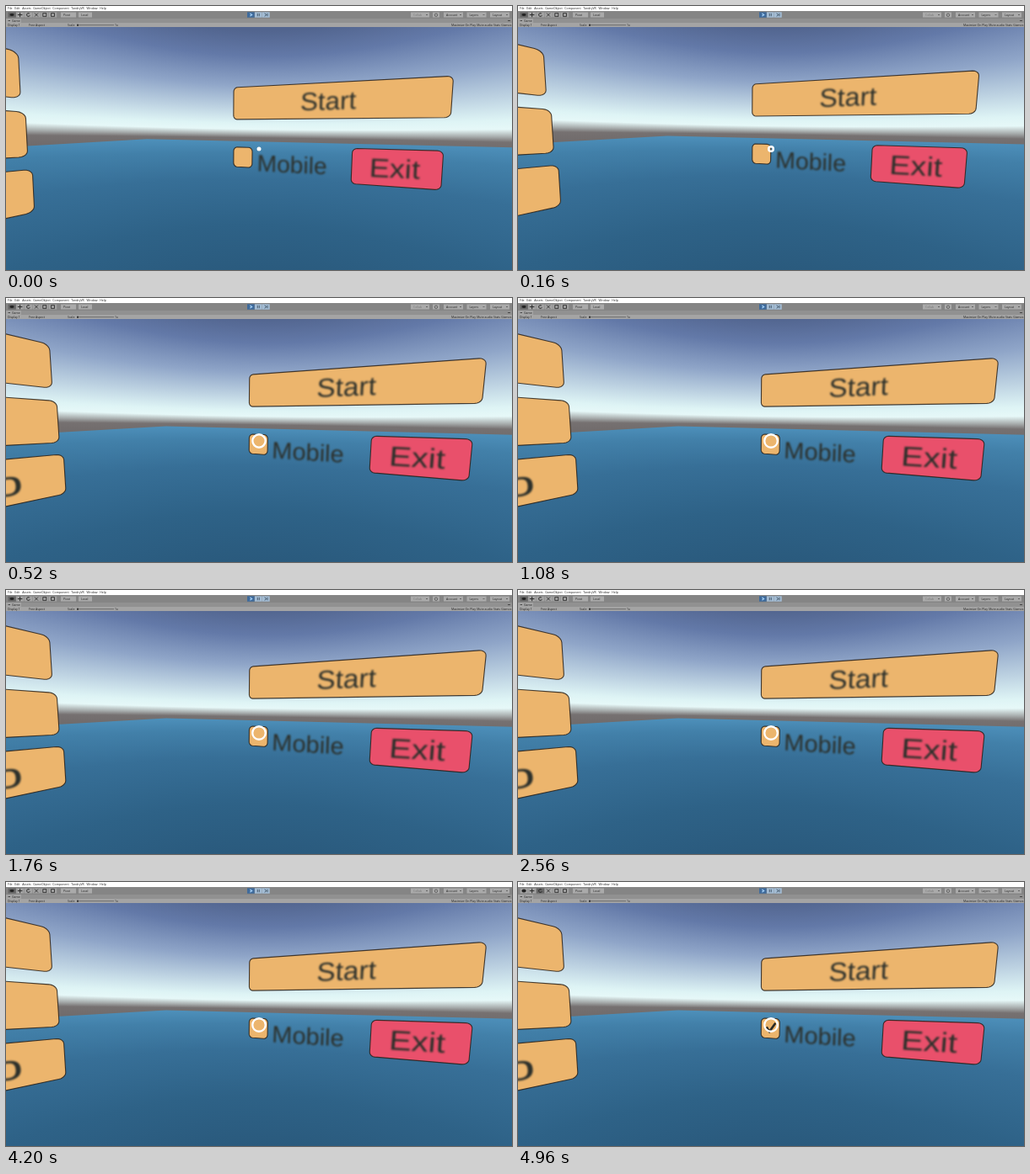
An HTML page with a canvas that plays this animation: 600 px wide and 314 px high, repeating every 5 s.

```html
<!DOCTYPE html>
<html lang="en">
<head>
<meta charset="utf-8">
<title>VR menu</title>
<style>
  html, body { margin: 0; height: 100%; overflow: hidden; }
  canvas { display: block; }
</style>
</head>
<body>
<canvas id="stage" width="600" height="314"></canvas>
<script>
const ctx = document.getElementById('stage').getContext('2d');
const LOOP = 5000, PAN_END = 520, GAZE_START = 135, CLICK = 4760;
const CX = 300, CY = 169.5, FOCAL = 250;
const ORANGE = '#ecb56d', RED = '#e9506b';
// The two menu walls stand at distance 1 from the viewer, facing them
const MAIN = .351, SIDE = -1.012;
// Pixels from the horizon at the middle column
const SKY = {
  125: '#52658f', 95: '#6379a8', 60: '#8fa5c8', 34: '#bcd1e1', 15: '#def4f5',
  8: '#e6f8f8', 2: '#a6abab', '-2': '#767171', '-20': '#686464'
};
const GROUND = { '-3': '#4f92bd', '-20': '#4280a9', '-50': '#376f97', '-105': '#2e6287', '-165': '#2a5a7d' };

const camera = { yaw: 0, pitch: 0, roll: .0145 };

function aim(t) {
  const left = 1 - Math.min(t / PAN_END, 1);
  camera.yaw = .0733 * left ** 1.5;
  camera.pitch = .083 - .024 * left ** 3;
}

// World axes: x right, y down, z ahead
function project(x, y, z) {
  const { yaw, pitch, roll } = camera;
  const ahead = x * Math.sin(yaw) + z * Math.cos(yaw);
  const depth = ahead * Math.cos(pitch) + y * Math.sin(pitch);
  const u = (x * Math.cos(yaw) - z * Math.sin(yaw)) / depth;
  const v = (y * Math.cos(pitch) - ahead * Math.sin(pitch)) / depth;
  return [CX + FOCAL * (u - roll * v), CY + FOCAL * (v + roll * u)];
}

function onWall(wall, s, y) {
  const sin = Math.sin(wall), cos = Math.cos(wall);
  return project(sin + s * cos, y, cos - s * sin);
}

function trace(points) {
  ctx.beginPath();
  points.forEach(p => ctx.lineTo(...p));
}

function rect(color, x, y, w, h) {
  ctx.fillStyle = color;
  ctx.fillRect(x, y, w, h);
}

function line(color, width, ...points) {
  ctx.strokeStyle = color;
  ctx.lineWidth = width;
  trace(points);
  ctx.stroke();
}

// Bands of equal elevation bend towards the horizon away from the middle
function paintBands(bands) {
  const offsets = Object.keys(bands).map(Number).sort((a, b) => b - a);
  const top = offsets[0], span = top - offsets[offsets.length - 1];
  for (let x = 0; x < 600; x += 4) {
    const u = (x + 2 - CX) / FOCAL, k = Math.hypot(1, u);
    const horizon = CY + FOCAL * (camera.roll * u - Math.tan(camera.pitch));
    const g = ctx.createLinearGradient(0, horizon - top * k, 0, horizon + (span - top) * k);
    for (const o of offsets) g.addColorStop((top - o) / span, bands[o]);
    rect(g, x, 25, 4, 289);
  }
}

function drawWorld() {
  paintBands(SKY);
  ctx.save();
  trace([project(-15, 1, 8.1), project(-20.5, 1, 46.5), project(46.7, 1, 19.9), [600, 314], [0, 314]]);
  ctx.clip();
  paintBands(GROUND);
  ctx.restore();
}

function panel(color, wall, left, top, right, bottom) {
  const r = .02, outline = [];
  for (let i = 0; i < 24; i++) {
    const corner = Math.floor(i / 6), a = (corner + i % 6 / 5) * Math.PI / 2;
    const s = corner === 0 || corner === 3 ? right - r : left + r;
    const y = corner < 2 ? bottom - r : top + r;
    outline.push(onWall(wall, s + r * Math.cos(a), y + r * Math.sin(a)));
  }
  trace(outline);
  ctx.closePath();
  ctx.fillStyle = color;
  ctx.fill();
  ctx.strokeStyle = 'rgba(40, 32, 25, .85)';
  ctx.lineWidth = 1.1;
  ctx.stroke();
}

function label(text, wall, s, y) {
  const step = .01, scale = .112 / step / 100;
  const [x0, y0] = onWall(wall, s, y);
  const [x1, y1] = onWall(wall, s + step, y);
  const [x2, y2] = onWall(wall, s, y + step);
  ctx.save();
  ctx.transform((x1 - x0) * scale, (y1 - y0) * scale, (x2 - x0) * scale, (y2 - y0) * scale, x0, y0);
  ctx.font = '100px "Liberation Sans", Arial, sans-serif';
  ctx.textAlign = 'center';
  ctx.filter = 'blur(0.8px)';
  ctx.fillStyle = '#2c302b';
  ctx.fillText(text, 0, 36);
  ctx.restore();
}

function drawMenu(t) {
  for (let i = 0; i < 3; i++) {
    const top = -.257 + .19 * i;
    panel(ORANGE, SIDE, -.2, top, .2475 + .0093 * i, top + .147);
  }
  label('o', SIDE, .13, .199);
  panel(ORANGE, MAIN, -.422, -.2424, .489, -.0828);
  label('Start', MAIN, .033, -.163);
  panel(ORANGE, MAIN, -.42, .058, -.32, .159);
  label('Mobile', MAIN, -.121, .132);
  panel(RED, MAIN, .1405, .048, .473, .2055);
  label('Exit', MAIN, .307, .127);
  if (t >= CLICK) {
    line('#292a27', 2.6, onWall(MAIN, -.39, .102), onWall(MAIN, -.374, .125), onWall(MAIN, -.342, .08));
  }
}

function drawReticle(t) {
  const grow = t < GAZE_START ? 0 : 1 - Math.exp((GAZE_START - t) / 95);
  ctx.fillStyle = '#fff';
  ctx.beginPath();
  ctx.arc(300, 170, 2.5 + 6.5 * grow, 0, 7);
  ctx.arc(300, 170, 6.6 * grow, 0, 7);
  ctx.fill('evenodd');
}

function tiny(text, x, y, color = '#222') {
  ctx.fillStyle = color;
  ctx.font = '3.5px "Open Sans", sans-serif';
  ctx.fillText(text, x, y);
  return x + ctx.measureText(text).width;
}

function button(text, x, w, color) {
  rect('#aaa', x, 7.5, w, 6);
  tiny(text, x + 3, 11.8, color);
}

function drawTools(selected) {
  const ink = '#222';
  for (let i = 0; i < 6; i++) rect(i === selected ? '#666' : '#a2a2a2', 2.5 + i * 9.7, 7.5, 9.2, 6);
  ctx.fillStyle = ink;
  ctx.beginPath();
  ctx.ellipse(7, 10.5, 2.6, selected ? 2 : 1.4, 0, 0, 7);
  ctx.fill();
  line(ink, .9, [13.8, 10.5], [19.4, 10.5]);
  line(ink, .9, [16.6, 7.8], [16.6, 13.2]);
  ctx.beginPath();
  ctx.arc(26.5, 10.5, 1.9, .3, 5.6);
  ctx.stroke();
  line(ink, .8, [34, 8.5], [38, 12.5]);
  line(ink, .8, [38, 8.5], [34, 12.5]);
  ctx.strokeRect(43.8, 8.7, 4, 3.6);
  ctx.strokeRect(53.6, 8.7, 3.8, 3.6);
}

function drawPlayButtons() {
  for (let i = 0; i < 3; i++) rect(i ? '#a3bcd4' : '#3f6b9c', 286 + i * 9, 7.3, 8.7, 6.4);
  line('#a8d4fa', 1.2, [289.4, 9], [291.6, 10.5], [289.4, 12]);
  for (const x of [298.3, 300.3, 310]) line('#345', .8, [x, 8.8], [x, 12.2]);
  line('#345', .8, [306.6, 8.8], [309, 10.5], [306.6, 12.2]);
}

function drawEditor(t) {
  rect('#fff', 0, 0, 600, 6);
  rect('#858585', 0, 6, 600, 9);
  rect('#919191', 0, 15, 600, 5);
  rect('#a4a4a4', 0, 15, 18, 5);
  rect('#a4a4a4', 0, 20, 600, 5);

  let x = 2;
  for (const item of 'File Edit Assets GameObject Component TandryVR Window Help'.split(' ')) {
    x = tiny(item, x, 4.2) + 2.7;
  }

  drawTools(t < CLICK ? 0 : 2);
  button('Pivot', 65, 18);
  button('Local', 86, 16);
  drawPlayButtons();
  button('Collab', 480, 22, '#777');
  button('', 506, 8);
  ['Account', 'Layers', 'Layout'].forEach((name, i) => button(name, 519 + 27.5 * i, 23));
  for (const right of [502, 542, 569.5, 597]) line('#333', .6, [right - 4, 10], [right - 3, 11], [right - 2, 10]);
  ctx.beginPath();
  ctx.arc(510, 10.7, 1.7, 0, 7);
  ctx.stroke();

  line('#333', .8, [2.5, 17.5], [5, 17.5]);
  tiny('Game', 7, 18.8);
  line('#333', .8, [595, 17.5], [598, 17.5]);
  tiny('Display 1', 2, 23.6);
  tiny('Free Aspect', 27, 23.6);
  tiny('Scale', 73, 23.6);
  line('#555', .7, [84, 22.7], [128, 22.7]);
  rect('#333', 84, 21.7, 2, 2);
  tiny('1x', 129, 23.6);
  x = 528;
  for (const item of ['Maximize On Play', 'Mute audio', 'Stats', 'Gizmos']) x = tiny(item, x, 23.6) + 1.2;
}

function draw(t) {
  aim(t);
  drawWorld();
  drawMenu(t);
  drawReticle(t);
  drawEditor(t);
}

function tick() {
  draw(performance.now() % LOOP);
  requestAnimationFrame(tick);
}
tick();
</script>
</body>
</html>
```
